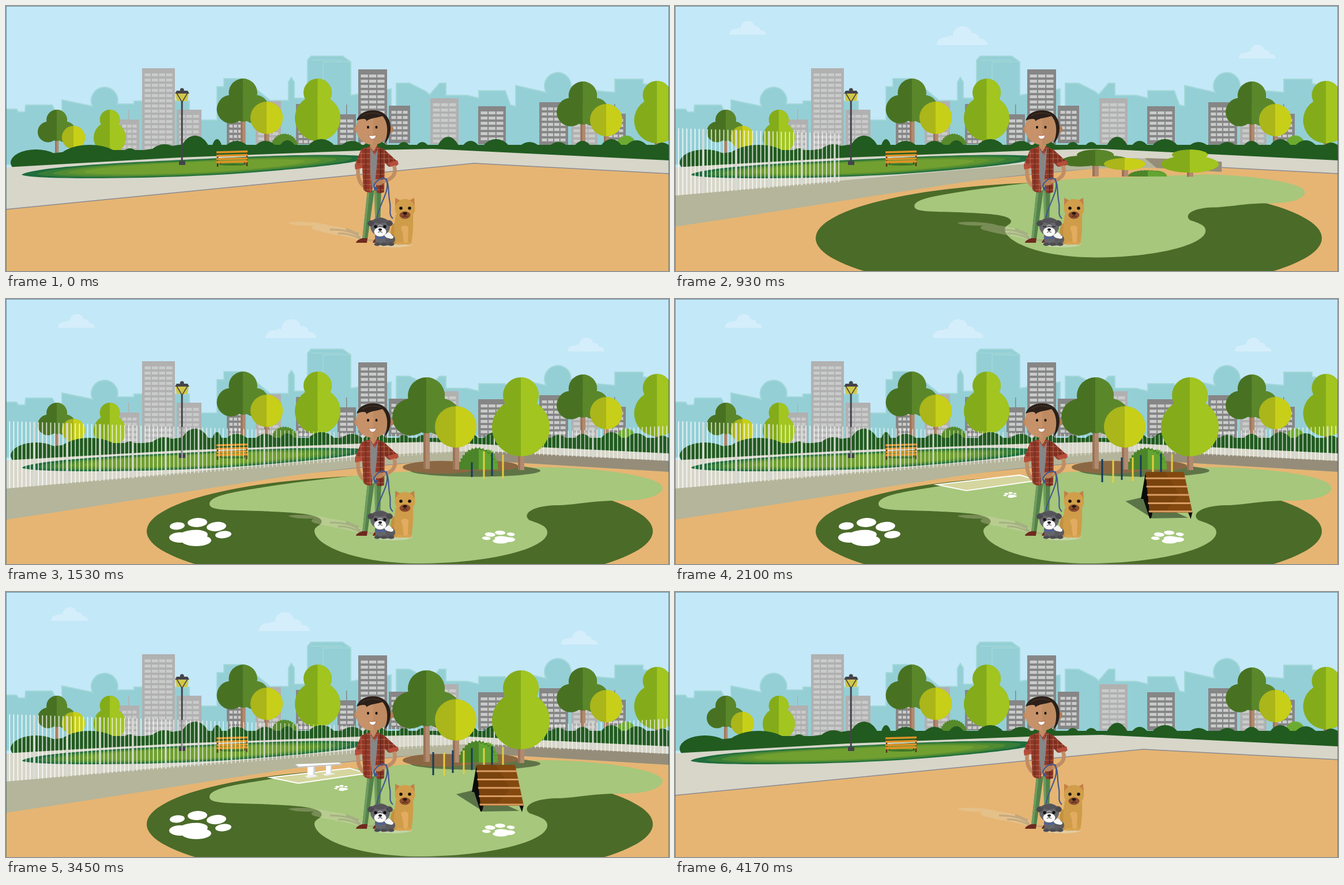
Recreate the animation shown at these times as an HTML page with a canvas. Size 1150 by 460 pixels, loop 4.5 s.

```html
<!DOCTYPE html>
<html lang="en">
<head>
<meta charset="utf-8">
<title>Dog park</title>
<style>
html, body { margin: 0; width: 100%; height: 100%; overflow: hidden; background: #c3e8f8; }
canvas { display: block; }
</style>
</head>
<body>
<canvas id="stage" width="1150" height="460"></canvas>
<script>
const c = document.getElementById('stage').getContext('2d');
const LOOP = 4500;

// ---- drawing helpers ----
function shape(d, fill, stroke, width = 1) {
  const p = new Path2D(d);
  if (fill) { c.fillStyle = fill; c.fill(p); }
  if (stroke) { c.strokeStyle = stroke; c.lineWidth = width; c.stroke(p); }
}
function oval(x, y, rx, ry, fill, turn = 0) {
  c.fillStyle = fill;
  c.beginPath();
  c.ellipse(x, y, rx, ry, turn, 0, 7);
  c.fill();
}
function rect(x, y, w, h, fill) {
  c.fillStyle = fill;
  c.fillRect(x, y, w, h);
}
function scaled(x, y, sx, sy, draw) {
  if (sx <= 0 || sy <= 0) return;
  c.save();
  c.translate(x, y);
  c.scale(sx, sy);
  c.translate(-x, -y);
  draw();
  c.restore();
}
function clipped(x, y, w, h, draw) {
  if (w <= 0) return;
  c.save();
  c.beginPath();
  c.rect(x, y, w, h);
  c.clip();
  draw();
  c.restore();
}

// ---- timing helpers ----
const part = (t, from, to) => Math.min(1, Math.max(0, (t - from) / (to - from)));
const smooth = u => (1 - Math.cos(Math.PI * u)) / 2;
const fade = (t, a, b, x, y) => smooth(part(t, a, b)) * (1 - smooth(part(t, x, y)));
const within = (t, a, b) => t >= a && t < b;
function pop(t, start, end, outTime = 110) {
  if (t < start) return 0;
  const d = t - start;
  const spring = d > 500 ? 1 : 1 - Math.exp(-d * 0.02) * Math.cos(d * Math.PI / 100);
  return spring * (1 - part(t, end, end + outTime) ** 2);
}

// ---- town ----
const skyline = `M0 179H18L22 184H33L34 172H80L86 183H97V163L150 174A23 23 0 1 1 193 170H222V165H318V198H366V140H378
  V126H412L458 164H490V132L495 124L500 132V160H523V94L529 87H584L598 97V155L668 144V175H677V134H700L728 148L735 154
  L752 134H763V155H800L820 160V147H866L875 172L884 174V138L937 150A23 23 0 1 1 980 139L1010 146L1056 150V127H1105
  V135L1150 140V260L0 275Z`;

function building(x, y, w, h, cols, dark, antenna) {
  const wall = dark ? '#868686' : '#b1b1b1';
  if (antenna) rect(x + 15, y - 17, 1.5, 18, wall);
  rect(x, y, w, h, wall);
  const pitch = (w - 7) / cols;
  for (let row = y + 9; row < y + h - 6; row += 9)
    for (let i = 0; i < cols; i++) rect(x + 4.5 + i * pitch, row, pitch - 2, 5, '#c9cbca');
}

const kinds = {
  oak: [[[0, 32, 32], [-27, 69, 32], [27, 69, 32], [0, 72, 25]], 159, '#487222', '#5b872b'],
  ball: [[[0, 36, 36]], 110, '#aab619', '#c8cf18'],
  pear: [[[0, 31, 31], [0, 87, 50]], 161, '#84ac1a', '#a2c520']
};
function tree(kind, x, top, s) {
  const [discs, foot, dark, light] = kinds[kind];
  const crown = col => discs.forEach(([dx, dy, r]) => oval(dx, dy, r, r, col));
  c.save();
  c.translate(x, top);
  c.scale(s, s);
  rect(-5, 60, 11, foot - 60, '#b18a6f');
  rect(-5, 60, 4, foot - 60, '#9b7258');
  crown(dark);
  clipped(0, -5, 100, 170, () => crown(light));
  c.restore();
}
function bush(x, y, rx, ry, fill) {
  c.fillStyle = fill;
  c.beginPath();
  for (let i = 0; i <= 32; i++) {
    const a = Math.PI * (1 + i / 32), k = i % 2 ? 1 : 0.92;
    c.lineTo(x + rx * k * Math.cos(a), y + ry * k * Math.sin(a));
  }
  c.fill();
}

// centre, top and half width of each hedge bump
const hedge = [[52, 249, 44], [145, 241, 58], [215, 247, 18], [275, 240, 32], [328, 225, 30], [366, 231, 12],
  [400, 234, 30], [450, 234, 28], [488, 233, 20], [547, 231, 33], [600, 234, 30], [640, 232, 30], [690, 236, 18],
  [722, 236, 18], [767, 227, 24], [806, 234, 22], [850, 231, 32], [908, 236, 28], [958, 236, 26], [1000, 234, 22],
  [1050, 231, 26], [1094, 233, 28], [1138, 237, 24]];

function town() {
  shape(skyline, '#94cfd6', '#a3d8d8', 2);
  shape('M550 180V97H598M529 94H584', null, '#a3d8d8', 1.5);
  building(236, 108, 57, 145, 4, false);
  building(197, 197, 34, 56, 3, false, true);
  building(296, 180, 43, 65, 3, false);
  building(383, 188, 30, 55, 3, true);
  building(433, 165, 44, 75, 3, false);
  building(503, 170, 34, 70, 3, true);
  building(575, 188, 32, 55, 2, true, true);
  building(611, 110, 50, 135, 3, true);
  building(664, 173, 37, 65, 3, true);
  building(736, 160, 49, 80, 3, false);
  building(819, 174, 48, 66, 3, true);
  building(925, 167, 50, 75, 4, true);
  building(980, 178, 46, 65, 3, false);
  building(1040, 187, 35, 55, 3, true, true);
  tree('oak', 88, 180, 0.56);
  tree('ball', 117, 208, 0.56);
  tree('pear', 180, 180, 0.56);
  tree('oak', 411, 126, 0.77);
  tree('ball', 452, 166, 0.78);
  tree('pear', 540.5, 126, 0.79);
  tree('oak', 1000.5, 131, 0.77);
  tree('ball', 1041, 170, 0.78);
  tree('pear', 1129, 130, 0.79);
  bush(483, 244, 24, 23, '#568a2a');
  bush(1076, 244, 18, 20, '#6cab30');
  hedge.forEach(([x, top, r]) => oval(x, 272, r, 272 - top, '#215b20'));
  shape('M10 279L60 258L130 250H240L300 241H1150V272L740 255Z', '#215b20');
}

function ground() {
  shape('M0 280L300 263L640 250L740 248L1150 268V460H0Z', '#d7d6c9');
  shape('M0 353L812 273L1150 291V460H0Z', '#e6b573');
  shape('M0 353L812 273L1150 291', null, '#8b8a92', 1.7);
  const lawn = new Path2D('M27 293C50 277 250 270 370 264C480 258 610 256 627 262C632 270 540 280 440 288C300 300 50 303 27 293Z');
  ['#1f6c3d', '#377d37', '#508b33', '#62952f', '#71a031'].forEach((col, i) => {
    const s = 1 - i * 0.09;
    scaled(325, 280, s, s, () => { c.fillStyle = col; c.fill(lawn); });
  });
  // lamp
  rect(303.7, 160, 3, 110, '#45434a');
  rect(300, 269, 11, 7, '#45434a');
  shape('M294 151H317L315 165H296Z', '#d0c748');
  shape('M296 151L305.3 167L315 151M305.3 167V175', null, '#45434a', 1.5);
  shape('M293 152L296 147H315L318 152Z', '#45434a');
  oval(305.3, 146, 3.5, 3.5, '#45434a');
  // bench
  shape('M367 254V279M418 252V278M372 272V275M414 271V275', null, '#55351b', 2.5);
  oval(393, 275, 24, 2, '#3d7428');
  for (const y of [254, 260, 266, 271])
    shape(`M365 ${y}L419 ${y - 1.5}`, null, '#dd9127', y > 270 ? 4 : 3.4);
}

// ---- park parts ----
function cloud(x, y, s) {
  c.save();
  c.translate(x, y);
  c.scale(s, s);
  shape('M0 24C0 16 7 13 13 14C16 11 19 12 20 13C20 -3 42 -4 44 9C52 8 54 14 54 16C60 16 64 19 64 24Z', '#d5eefb');
  c.restore();
}
function fence() {
  // slats grow thinner towards the far corner
  const posts = (gap, width, fill) => {
    for (let x = -8; x < 1160; x += gap) {
      const r = Math.max(0, x - 790), w = width * (0.5 + Math.abs(x - 720) / 1440);
      const top = r ? 238 - r * 0.05 : 212 + x * 0.033;
      const base = r ? 265 + r * 0.045 : 329 - x * 0.081;
      rect(x - w / 2, top, w, base - top, fill);
    }
  };
  posts(57 / 8, 1.9, 'rgba(255,255,255,.8)');
  posts(57, 3.9, '#d9dcd7');
}
function path() {
  shape('M0 329L610 274L700 268L800 264L1150 281V300L830 281L760 281C680 284 590 293 480 309C320 333 130 364 0 383Z', '#b4b59b');
  shape('M815 264L850 265L1150 281V300L835 281Z', '#958d79');
}
const clearing = `M353 356C353 339 410 333 470 323C550 312 650 300 740 298C840 297 900 292 940 292C1030 293 1139 308 1139 328
  C1138 341 1110 350 1070 350C1020 349 985 358 955 358C910 359 895 374 908 384C925 390 939 394 939 405
  C939 433 840 459 716 459C608 459 535 428 535 402C536 393 550 393 547 384C541 370 470 370 440 368C390 366 353 368 353 356Z`;

function paw(x, y, sx, sy) {
  c.save();
  c.translate(x, y);
  c.scale(sx, sy);
  oval(-13, 7, 26, 10, '#fff', -0.1);
  oval(-35, 10, 19, 9, '#fff');
  oval(-7, 15, 26, 10, '#fff');
  oval(-40, -10, 13, 6.5, '#fff', -0.1);
  oval(-5, -16, 17, 8, '#fff', -0.05);
  oval(28, -9, 17, 8, '#fff', -0.1);
  oval(40, 5, 14, 6.3, '#fff', -0.1);
  c.restore();
}
const poles = [[862, 269, 311], [843, 268, 307], [829, 271, 312], [808, 271, 309],
  [794, 275, 316], [775, 275, 314], [760, 279, 319], [741, 278, 318]];

function ramp() {
  shape('M781 351L811 344L890 380L828 381Z', 'rgba(62,84,52,.72)');
  shape('M816 301L808 347H812L823 381H826L828 371Z', '#0a0a0a');
  shape('M890 370L895 382L898 370Z', '#0a0a0a');
  shape('M816 300H883L898 371H823Z', '#84490f');
  shape('M816 300L850 300L875 340L850 371H823Z', 'rgba(70,34,0,.15)');
  for (let i = 0; i < 5; i++) {
    const y = 311 + i * 14.5;
    shape(`M${816 + i * 1.4} ${y}H${886 + i * 2.9}`, null, '#d99d64', 3);
  }
}
function table() {
  rect(523, 301, 12, 19, '#fff');
  rect(555, 299, 10, 17, '#fff');
  rect(533, 303, 3, 17, '#cfd2d4');
  rect(563, 300, 2, 16, '#cfd2d4');
  shape('M518 319L536 317L541 320L523 323ZM549 316L566 314L571 316L554 319Z', '#eef0f0');
  shape('M502 299L578 296L582 298L508 303Z', '#fff');
  shape('M502 299L508 303L582 298V300L508 305L502 301Z', '#c4c8cc');
}

// ---- man and dogs ----
const shirt = 'M616 249L632 243L637 250L643 243L656 249L680 271L678 277L664 279L657 272L656 323Q650 326 643 324L640 300L634 324Q624 324 620 319L618 281L606 283L605 276Z';

function man(blink) {
  shape('M490 376C510 373 550 376 560 381C590 384 612 392 617 400L640 408L612 407C598 400 560 396 540 390C525 387 530 382 535 381C515 382 492 380 490 376Z', 'rgba(225,215,190,.3)');
  shape('M562 388C585 388 600 391 615 402M576 395C590 393 605 399 620 407M590 387L612 396M620 405L650 409', null, 'rgba(130,125,110,.35)', 3);
  // legs and shoes
  shape('M627 320H639L627 405H618Z', '#53824a');
  shape('M639 320H651L648 405H641Z', '#53824a');
  shape('M627 320H631L622 405H618ZM639 320H643L644 405H641Z', '#6f9b60');
  shape('M607 411Q608 406 618 403L627 403L626 411Z', '#6e2a1e');
  shape('M636 411Q638 405 642 403H649V411Z', '#6e2a1e');
  // arms and neck
  shape('M611 280Q608 306 624 315', null, '#c18d64', 6.5);
  rect(632, 236, 12, 16, '#b27f58');
  // torso
  shape('M631 246H645L644 306L635 318L631 300Z', '#868687');
  c.save();
  c.clip(new Path2D(shirt));
  rect(600, 240, 85, 90, '#933625');
  rect(646, 240, 40, 90, 'rgba(75,20,15,.25)');
  let grid = '';
  for (let i = 0; i < 10; i++) grid += `M602 ${247 + i * 9}H684M${608 + i * 8} 240V328`;
  shape(grid, null, 'rgba(226,176,140,.5)', 0.9);
  shape('M624 245V325M649 245V325', null, 'rgba(70,25,20,.5)', 2.5);
  c.restore();
  shape('M632 247L640 259L645 247L643 280L640 306L635 318L632 290Z', '#868687');
  shape('M631 243L637 253L643 243L641 240H633Z', '#c18d64');
  shape('M605 276L618 275V281L606 284ZM664 272L679 268L681 275L666 279Z', '#b84d3c');
  shape('M673 277Q681 299 650 306', null, '#c18d64', 6.5);
  oval(646, 306, 8, 5.5, '#b98257');
  // head
  oval(608, 214, 4, 6, '#bd875f');
  oval(668, 214, 4, 6, '#b27c55');
  oval(636, 211.5, 29, 29.5, '#c79269');
  clipped(637, 180, 30, 62, () => oval(636, 211.5, 29, 29.5, '#be8a61'));
  shape('M608 199C612 186 624 181 637 181C657 181 668 196 667 214C666 226 662 234 656 239C663 224 664 203 653 191C641 195 632 194 625 200C626 195 617 195 608 199Z', '#2b2019');
  shape('M618 191Q632 182 650 188', null, '#4a3a2e', 1);
  for (const x of [628, 642.5]) {
    if (blink) shape(`M${x - 3} 210.5H${x + 3}`, null, '#35241b', 1.2);
    else oval(x, 210.5, 2, 2.4, '#17110d');
  }
  shape('M629.5 224.5Q636 226 642 224Q641 231 635.5 231Q631 231 629.5 224.5Z', '#fff', '#9d5742', 0.7);
  // leash
  shape('M640 316C634 309 648 298 656 299C666 303 662 325 666 342C668 355 663 362 671 369M659 299C668 320 648 342 643 368', null, '#42598f', 2.2);
  oval(641, 317, 3, 3.5, '#42598f');
}
function tanDog() {
  oval(671, 413, 34, 6, 'rgba(225,225,205,.5)');
  oval(675, 395, 8, 18, '#c4903f');
  shape('M676 362H706Q707 392 703 412L690 414H677Q670 400 676 362Z', '#cf9c49');
  shape('M685 384Q692 378 698 384L697 412H690L688 394Z', '#e2ab5f');
  oval(683, 412, 6, 2.5, '#d7a453');
  oval(698, 412, 6, 2.5, '#d7a453');
  shape('M675 348V333L687 339ZM709 348L708 333L697 339Z', '#c67f45');
  oval(692, 352, 17.5, 17, '#d19f4b');
  oval(692, 363, 9.5, 6.5, '#8b4c2d');
  oval(692, 360, 3.5, 2.3, '#241713');
  shape('M692 361V365M688 366Q692 363 696 366', null, '#3d2018', 1.2);
  for (const x of [685, 700]) oval(x, 351, 2.8, 2.8, '#17110d');
}
function greyDog(blink) {
  oval(658, 405, 17, 11, '#5b5a5e');
  shape('M640 394H659L658 415H641Z', '#66656a');
  for (const x of [644, 655, 668]) oval(x, 413.5, 5.5, 3, '#4d4c50');
  oval(663, 398, 7, 5, '#f4f4f2', 0.4);
  oval(668, 401, 4, 3, '#f4f4f2');
  oval(649, 383, 17, 16, '#68676c');
  oval(633, 377, 6, 5, '#4b4a4f', -0.4);
  oval(665, 377, 6, 5, '#4b4a4f', 0.4);
  shape('M632 374Q649 362 666 374L649 378Z', '#55545a');
  shape('M645 382L649 380L653 382', null, '#a3a2a5', 2);
  shape('M640 401Q649 405 658 401', null, '#4a62a5', 2.5);
  oval(649, 392, 10.5, 8, '#fafafa');
  oval(649, 388, 3, 2, '#151515');
  shape('M649 389V392M645 393Q649 390 653 393', null, '#333', 1);
  for (const x of [641, 657]) {
    if (blink) shape(`M${x - 3} 383H${x + 3}`, null, '#1c1c1e', 1.2);
    else oval(x, 383, 2.7, 2.7, '#121214');
  }
}

// ---- one picture ----
function draw(t) {
  rect(0, 0, 1150, 460, '#c3e8f8');
  c.globalAlpha = fade(t, 690, 900, 3980, 4140);
  const drift = (t - 930) * 0.00615;
  cloud(94 - drift, 26, 1);
  cloud(454 - drift, 35, 1.38);
  cloud(978 - drift, 67, 1);
  c.globalAlpha = 1;
  town();
  ground();

  const pathEnd = Math.min((t - 504) * 2.226, 1150 * (1 - part(t, 3850, 4140)));
  clipped(0, 200, pathEnd, 260, path);
  const field = fade(t, 470, 545, 4050, 4165);
  scaled(683, 403, field, field, () => oval(683, 403, 439, 97, '#4b6b29'));
  const green = fade(t, 680, 1010, 3830, 4060);
  scaled(804, 296, green, green, () => shape(clearing, '#a6c77c'));
  const fenceEnd = Math.min((t - 802) * 2.226, 1150 * (1 - part(t, 3720, 4020)));
  clipped(0, 200, fenceEnd, 140, fence);

  const mound = fade(t, 950, 1100, 3790, 3900);
  scaled(808, 296, mound, mound, () => {
    oval(814, 298, 113, 10.5, '#5f7447');
    oval(755, 292, 67, 11, '#8b6843');
    oval(838, 290, 50, 9, '#8b6843');
  });
  const grow = pop(t, 917, 3720, 150);
  scaled(808, 296, 1, grow, () => {
    bush(836, 296, 18, 36, '#62a532');
    bush(818, 296, 34, 39, '#4c8529');
    clipped(820, 255, 32, 42, () => bush(818, 296, 34, 36, '#62a532'));
    tree('oak', 729, 136, 1);
    tree('ball', 780, 186, 1);
    tree('pear', 893, 136, 1);
  });

  poles.forEach(([x, top, base], i) => {
    const h = (base - top) * pop(t, 1335 + i * 55, 3640 - i * 12, 70);
    rect(x - 1.5, base - h, 3, h, i % 2 ? '#153c5f' : '#e6cd3f');
  });
  let s = pop(t, 1180, 3590, 95);
  if (s > 0) paw(337, 404, s, s);
  s = pop(t, 1260, 3580, 95);
  if (s > 0) paw(854.5, 413, -0.53 * s, 0.46 * s);
  s = pop(t, 1900, 3550, 95);
  if (s > 0) paw(581, 340, -0.22 * s, 0.21 * s);
  s = pop(t, 1875, 3540);
  scaled(842, 341, s, s, ramp);
  s = pop(t, 1970, 3540);
  scaled(545, 318, s, s, () => shape('M458 322L596 306L626 315L507 332Z', '#d5d69f', '#fff', 1.8));
  s = pop(t, 2250, 3470);
  scaled(542, 320, s, s, table);

  man(within(t, 505, 600));
  tanDog();
  greyDog(within(t, 900, 990) || within(t, 2820, 2910));
  c.strokeStyle = 'rgba(50,85,95,.6)';
  c.lineWidth = 1;
  c.strokeRect(0.5, 0.5, 1149, 470);
}

let begin;
function tick(now) {
  begin ??= now;
  draw((now - begin) % LOOP);
  requestAnimationFrame(tick);
}
requestAnimationFrame(tick);
</script>
</body>
</html>
```
